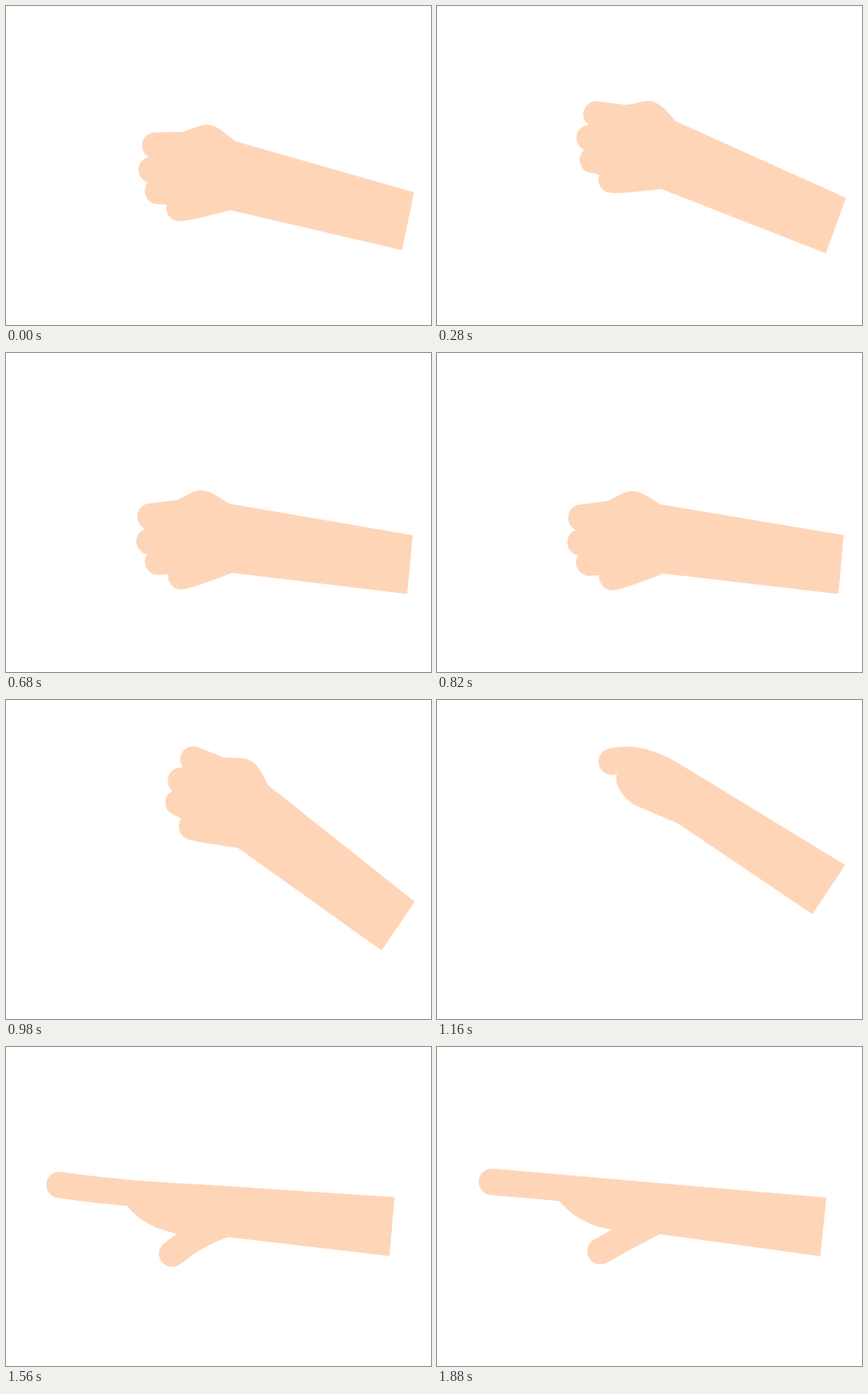
Animation of 500 by 375 pixels, one loop 8000 ms. Source, as an HTML page:

```html
<!DOCTYPE html>
<html lang="en">
<head>
<meta charset="utf-8">
<title>Hand game</title>
<style>
  html, body { margin: 0; width: 100%; height: 100%; overflow: hidden; background: #fff; }
  svg { display: block; width: 100%; height: 100%; }
  .skin { fill: #ffd5b8; }
  .digit { fill: none; stroke: #ffd5b8; stroke-width: 31; stroke-linecap: round; }
</style>
</head>
<body>
<svg viewBox="0 0 500 375">
  <g id="fist">
    <path class="skin" d="M480 219 L270 159 C262 154 250 139.5 236 139.5 C227 139.5 219 145 208 148
      L177 148.5 A15.5 15.5 0 0 0 168 177.5 A15.5 15.5 0 0 0 167 207.5
      A15.5 15.5 0 0 0 179 233 L189 233.5 A15.5 15.5 0 0 0 204 253
      C214 253 240 246 264 240 L466 287 Z"/>
  </g>
  <g id="open">
    <path id="palm" class="skin"/>
    <path id="index" class="digit"/>
    <path id="thumb" class="digit"/>
  </g>
</svg>
<script>
const LOOP = 8000, STEP = 20, OPEN_AT = 1020;
const PIVOT = '435 230';
const REST_ANGLE = -5.8;
const el = id => document.getElementById(id);

// Monotone cubic curve: smooth through every key, flat at peaks and at both ends.
function track(times, values) {
  const rate = values.slice(1).map((v, i) => (v - values[i]) / (times[i + 1] - times[i]));
  const slope = times.map((_, i) => {
    const a = rate[i - 1] || 0, b = rate[i] || 0;
    return a * b > 0 ? 2 * a * b / (a + b) : 0;
  });
  return t => {
    if (t <= times[0]) return values[0];
    const i = times.findIndex(key => key > t) - 1;
    if (i < 0) return values[values.length - 1];
    const span = times[i + 1] - times[i], u = (t - times[i]) / span, w = 1 - u;
    return values[i] * w * w * (1 + 2 * u) + values[i + 1] * u * u * (3 - 2 * u)
      + span * u * w * (slope[i] * w - slope[i + 1] * u);
  };
}

const armAngle = track(
  [0, 345, 480, 780, 820, 980, 1055, 1300, 1490, 1560, 1640],
  [0, 9.1, 4.95, -9, -6.46, 22.45, 28.8, 6.8, -7.5, -6.8, REST_ANGLE]);

const unfold = (...values) => track([1020, 1300, 1480, 1560, 1880], values);
const pose = {
  tipX: unfold(178, 121, 60.5, 64.2, 64.5),
  tipY: unfold(222, 168, 154, 155.5, 158.5),
  bendX: unfold(190, 165, 125, 125, 125),
  bendY: unfold(180, 171, 166.5, 166.3, 163.8),
  frontX: unfold(178, 159, 143, 143, 143),
  frontY: unfold(205, 186, 182, 181.5, 180),
  wristY: unfold(182, 175.3, 173.3, 173.3, 172.8),
  thumbX: unfold(215, 202.5, 197, 195.3, 192.3),
  thumbY: unfold(208, 206.5, 234, 238.8, 240),
  thumbBend: unfold(0, 0, -8, -7, -1)
};

function drawOpenHand(t) {
  const p = {};
  for (const key in pose) p[key] = pose[key](t);
  const baseX = 229, thumbBaseX = 254.6, thumbBaseY = 206.4;
  const midX = (thumbBaseX + p.thumbX) / 2;
  const midY = (thumbBaseY + p.thumbY) / 2 + p.thumbBend;

  el('palm').setAttribute('d',
    `M458 177 L${baseX + 1.3} ${p.wristY - 15.5} L${baseX} ${p.wristY} L${p.frontX} ${p.frontY}
     Q164 ${p.frontY + 27} 204 ${p.frontY + 34.5} L262 ${p.wristY + 47.3} L451 246 Z`);
  el('index').setAttribute('d',
    `M${baseX} ${p.wristY} Q${p.bendX} ${p.bendY} ${p.tipX} ${p.tipY}`);
  el('thumb').setAttribute('d',
    `M${thumbBaseX} ${thumbBaseY} Q${midX} ${midY} ${p.thumbX} ${p.thumbY}`);
}

function render(t) {
  const opened = t >= OPEN_AT, angle = armAngle(t);
  el('fist').style.display = opened ? 'none' : '';
  el('open').style.display = opened ? '' : 'none';
  el('fist').setAttribute('transform', `rotate(${angle} ${PIVOT})`);
  el('open').setAttribute('transform', `rotate(${angle - REST_ANGLE} ${PIVOT})`);
  if (opened) drawOpenHand(t);
}

const start = performance.now();
function tick() {
  const t = (performance.now() - start) % LOOP;
  render(Math.floor(t / STEP) * STEP);
  requestAnimationFrame(tick);
}
tick();
</script>
</body>
</html>
```
